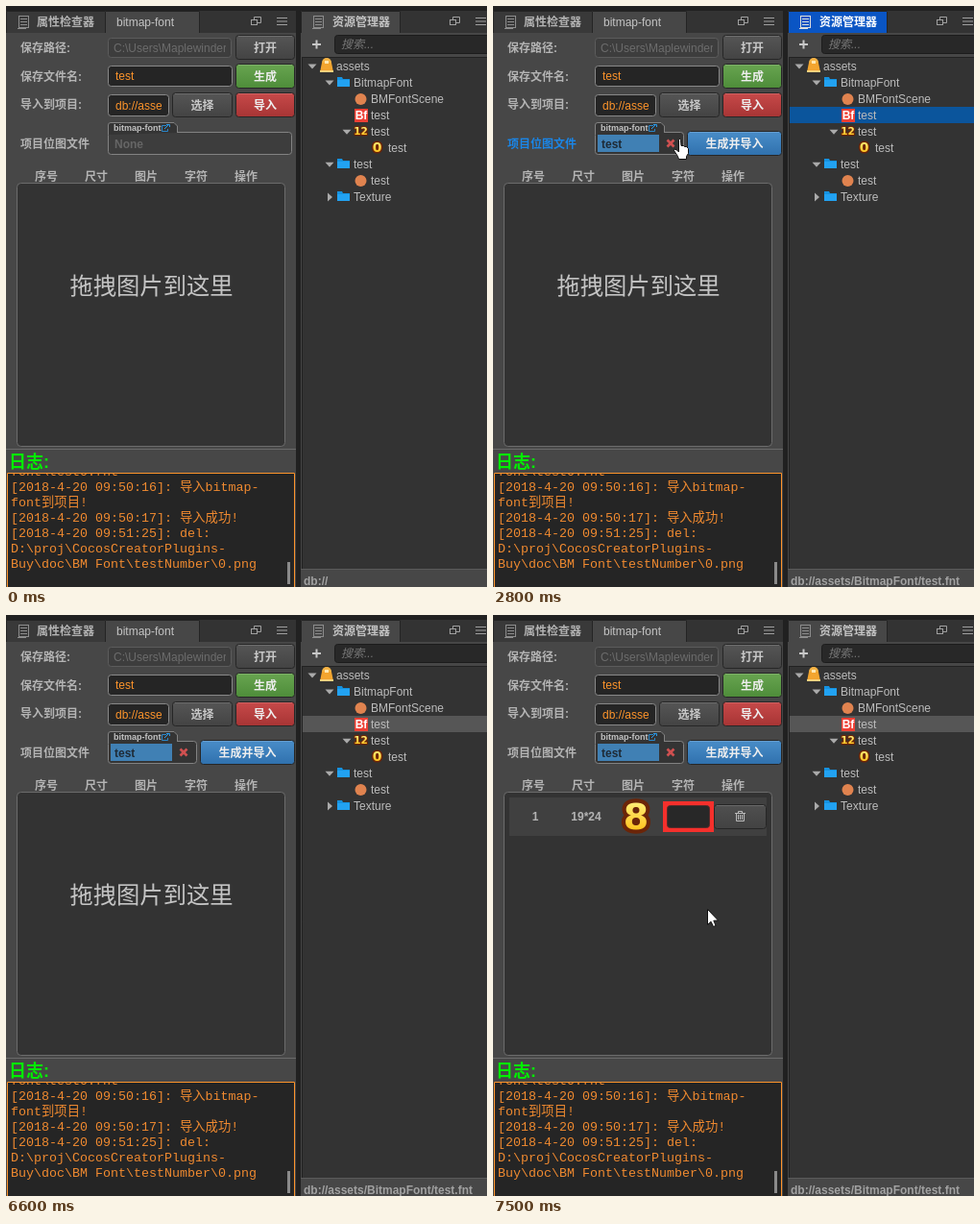
Animation, 501 px wide and 605 px high, one loop 8000 ms. Source, as an HTML page with a canvas:

```html
<!DOCTYPE html>
<html lang="zh-CN">
<head>
<meta charset="utf-8">
<style>
html, body { margin: 0; width: 100%; height: 100%; overflow: hidden; background: #222; }
canvas { display: block; }
</style>
</head>
<body>
<canvas id="stage" width="501" height="605"></canvas>
<script>
const ctx = document.getElementById('stage').getContext('2d');
const LOOP = 8000;
const SANS = '"Liberation Sans","Noto Sans CJK SC","Noto Sans CJK",sans-serif';
const MONO = '"Liberation Mono","Noto Sans CJK SC","Noto Sans CJK",monospace';
const GREY = '#b4b4b4', ORANGE = '#fd942b', BODY = '#474747', DARK = '#333', BLUE = '#0a55c4';

function rect(x, y, w, h, fill) {
  ctx.fillStyle = fill;
  ctx.fillRect(x, y, w, h);
}

function box(x, y, w, h, fill, border, r = 3) {
  ctx.beginPath();
  ctx.roundRect(x + .5, y + .5, w - 1, h - 1, r);
  ctx.fillStyle = fill;
  ctx.fill();
  ctx.strokeStyle = border;
  ctx.lineWidth = 1;
  ctx.stroke();
}

function shade(y, h, top, bottom) {
  const g = ctx.createLinearGradient(0, y, 0, y + h);
  g.addColorStop(0, top);
  g.addColorStop(1, bottom);
  return g;
}

// y is the vertical middle of the glyphs
function text(s, x, y, color = GREY, { size = 12, weight = 'normal', align = 'left', family = SANS } = {}) {
  ctx.font = `${weight} ${size}px ${family}`;
  ctx.textAlign = align;
  ctx.fillStyle = color;
  ctx.fillText(s, x, Math.round(y + size * .37));
}
const bold = (s, x, y, color, align) => text(s, x, y, color, { weight: 'bold', align });

function shape(points, fill) {
  ctx.beginPath();
  points.forEach(([x, y]) => ctx.lineTo(x, y));
  ctx.closePath();
  ctx.fillStyle = fill;
  ctx.fill();
}

function line(points, color, width = 1) {
  ctx.beginPath();
  points.forEach(([x, y]) => ctx.lineTo(x, y));
  ctx.strokeStyle = color;
  ctx.lineWidth = width;
  ctx.stroke();
}

function clipped(x, y, w, h, draw) {
  ctx.save();
  ctx.beginPath();
  ctx.rect(x, y, w, h);
  ctx.clip();
  draw();
  ctx.restore();
}

function button(label, x, y, w, h, top, bottom, color = '#eee') {
  box(x, y, w, h, shade(y, h, top, bottom), '#262626');
  line([[x + 3, y + 1.5], [x + w - 3, y + 1.5]], 'rgba(255,255,255,.14)');
  bold(label, x + w / 2, y + h / 2 + .5, color, 'center');
}

function input(x, y, w, h, value) {
  box(x, y, w, h, '#252525', '#888');
  clipped(x + 7, y, w - 15, h, () => text(value, x + 8, y + h / 2, ORANGE));
}

function docIcon(x, active) {
  const c = active ? '#ddd' : '#8c8c8c';
  ctx.strokeStyle = c;
  ctx.lineWidth = 1;
  ctx.strokeRect(x + 1.5, 10.5, 10, 12);
  for (const y of [13.5, 16.5, 19.5]) line([[x + 3, y], [x + 10, y]], c);
  line([[x, 23.5], [x + 9, 23.5]], c);
}

function windowIcons(x) {
  ctx.strokeStyle = '#a0a0a0';
  ctx.lineWidth = 1;
  ctx.strokeRect(x + .5, 14.5, 6, 5);
  line([[x + 3.5, 14], [x + 3.5, 11.5], [x + 10.5, 11.5], [x + 10.5, 17.5], [x + 7, 17.5]], '#a0a0a0');
  for (const y of [12.5, 16, 19.5]) line([[x + 27, y], [x + 38, y]], '#a0a0a0');
}

function tab(x, w, active, focused) {
  rect(x, 5, w, 23, focused ? BLUE : active ? BODY : '#393939');
  line([[x + .5, 28], [x + .5, 5.5], [x + w - .5, 5.5], [x + w - .5, 28]], '#242424');
}

function digits(s, x, y, size) {
  ctx.font = `bold ${size}px "DejaVu Sans",sans-serif`;
  ctx.textAlign = 'center';
  ctx.lineJoin = 'round';
  const base = y + size * .365;
  ctx.lineWidth = size * .22;
  ctx.strokeStyle = '#6b2508';
  ctx.strokeText(s, x, base);
  ctx.fillStyle = shade(y - size * .4, size * .8, '#fff07a', '#ffc21e');
  ctx.fillText(s, x, base);
  ctx.lineJoin = 'miter';
}

function arrowIcon(x, y, open) {
  shape(open ? [[x - 4.5, y - 2], [x + 4.5, y - 2], [x, y + 3]]
             : [[x - 2, y - 4.5], [x - 2, y + 4.5], [x + 3, y]], '#aaa');
}

function folder(x, y) {
  shape([[x, y - 5], [x + 5, y - 5], [x + 6, y - 3], [x + 13, y - 3], [x + 13, y + 5], [x, y + 5]], '#1592e0');
  rect(x, y - 2, 13, 7, '#22a2f2');
}

function dot(x, y) {
  ctx.beginPath();
  ctx.arc(x, y, 6, 0, 7);
  ctx.fillStyle = '#e0834f';
  ctx.fill();
}

function bag(x, y) {
  ctx.beginPath();
  ctx.arc(x, y - 3, 5, 0, 7);
  ctx.fillStyle = '#f6b445';
  ctx.fill();
  shape([[x - 5, y - 3], [x + 5, y - 3], [x + 7, y + 7], [x - 7, y + 7]], '#f3a52f');
  rect(x - 2, y - 5, 4, 3, '#ffe7b0');
  rect(x - 7, y + 5, 14, 2, '#ffd27c');
}

function leftPanel(s) {
  rect(0, 5, 302, 600, BODY);
  rect(0, 5, 302, 23, DARK);
  tab(0, 104, false, false);
  docIcon(12, false);
  bold('属性检查器', 32, 17, GREY);
  tab(103, 99, true, s.focus === 'left');
  text('bitmap-font', 115, 17, s.focus === 'left' ? '#fff' : '#c4c4c4');
  windowIcons(255);

  const labels = ['保存路径:', '保存文件名:', '导入到项目:'];
  labels.forEach((label, i) => bold(label, 15, 44 + 29.5 * i, GREY));
  bold('项目位图文件', 15, 143.5, s.labelHot ? '#1a86e8' : GREY);

  box(106, 33, 129, 21, '#3d3d3d', '#5c5c5c');
  clipped(110, 33, 119, 21, () => text('C:\\Users\\Maplewinders', 112, 44, '#6c6c6c'));
  button('打开', 239, 30, 62, 26, '#565656', '#434343', '#c8c8c8');
  input(106, 62, 130, 22, 'test');
  button('生成', 239, 60, 62, 26, '#69a551', '#4d8c39');
  input(106, 92, 64, 23, 'db://asse');
  button('选择', 173, 90, 63, 26, '#565656', '#434343', '#c8c8c8');
  button('导入', 239, 90, 62, 26, '#c84a4a', '#a63434');
  assetField(s);

  ['序号', '尺寸', '图片', '字符', '操作'].forEach((h, i) => bold(h, 30 + 52 * i, 178, GREY));
  box(11, 184, 280, 275, DARK, '#6c6c6c', 4);
  if (s.row) imageRow();
  else text('拖拽图片到这里', 151.5, 291, '#c4c4c4', { size: 24.3, align: 'center' });
  log();
}

function assetField({ filled, dropHot }) {
  const border = dropHot ? ORANGE : '#828282';
  box(106, 131, filled ? 93 : 192, 24, filled ? '#343434' : '#3d3d3d', border);
  ctx.beginPath();
  ctx.moveTo(106.5, 134);
  ctx.lineTo(106.5, 124);
  ctx.quadraticCurveTo(106.5, 121.5, 109, 121.5);
  ctx.lineTo(175, 121.5);
  ctx.lineTo(178.5, 125);
  ctx.lineTo(178.5, 132);
  ctx.fillStyle = '#343434';
  ctx.fill();
  ctx.strokeStyle = border;
  ctx.stroke();
  text('bitmap-font', 112, 127, '#c4c4c4', { size: 9, weight: 'bold' });
  line([[167, 124.5], [162.5, 124.5], [162.5, 130.5], [168.5, 130.5], [168.5, 128]], '#2a86c8');
  line([[165, 128], [170, 123]], '#2a9ae8');
  line([[167, 123.5], [170.5, 123.5], [170.5, 126]], '#2a9ae8');
  if (!filled) {
    bold('None', 113, 144, '#666');
    return;
  }
  rect(109, 134, 64, 18, '#4080b4');
  bold('test', 113, 143.5, '#1e2a36');
  line([[181.5, 139.5], [188.5, 146.5]], '#d05050', 2.6);
  line([[188.5, 139.5], [181.5, 146.5]], '#d05050', 2.6);
  button('生成并导入', 202, 130, 99, 26, '#4a8ec9', '#2f70ad');
}

function imageRow() {
  rect(17, 190, 268, 40, '#404040');
  bold('1', 44, 210, GREY, 'center');
  bold('19*24', 97, 210, GREY, 'center');
  digits('8', 149, 209, 38);
  rect(177, 194, 53, 32, '#f5302c');
  box(181, 198, 45, 24, '#282828', '#5a2a2a');
  button('', 230, 197, 55, 26, '#505050', '#424242');
  const c = '#bbb';
  line([[252, 206.5], [263, 206.5]], c);
  line([[255.5, 206], [255.5, 204.5], [259.5, 204.5], [259.5, 206]], c);
  line([[253.5, 207], [253.5, 214.5], [261.5, 214.5], [261.5, 207]], c);
  for (const x of [255.5, 257.5, 259.5]) line([[x, 208], [x, 213]], c);
}

function log() {
  line([[0, 461.5], [302, 461.5]], '#6a6a6a');
  text('日志:', 3, 474, '#00f000', { size: 18, weight: 'bold' });
  rect(1, 486, 300, 119, '#252525');
  clipped(2, 487, 290, 118, () => [
    'font\\test0.fnt',
    '[2018-4-20 09:50:16]: 导入bitmap-',
    'font到项目!',
    '[2018-4-20 09:50:17]: 导入成功!',
    '[2018-4-20 09:51:25]: del:',
    'D:\\proj\\CocosCreatorPlugins-',
    'Buy\\doc\\BM Font\\testNumber\\0.png'
  ].forEach((s, i) => text(s, 5, 484.5 + 16 * i, '#f08a30', { size: 13.333, family: MONO })));
  rect(293, 579, 3, 23, '#8a8a8a');
  line([[1.5, 605], [1.5, 486.5], [300.5, 486.5], [300.5, 605]], ORANGE);
}

function rightPanel(s) {
  const focused = s.focus === 'right';
  rect(307, 5, 194, 600, BODY);
  rect(307, 5, 194, 23, DARK);
  tab(307, 104, true, focused);
  docIcon(319, focused);
  bold('资源管理器', 340, 17, focused ? '#fff' : '#c4c4c4');
  windowIcons(462);

  rect(319, 39, 9, 2, '#c8c8c8');
  rect(322.5, 35.5, 2, 9, '#c8c8c8');
  box(342, 30, 170, 20, '#282828', s.searchHot ? '#999' : '#1c1c1c');
  text('搜索...', 349, 40, '#777', { weight: 'italic' });

  rect(308, 53, 193, 533, DARK);
  line([[308.5, 586], [308.5, 53.5], [501, 53.5]], '#222');
  line([[307, 586.5], [501, 586.5]], '#5a5a5a');
  if (s.selected) rect(309, 105, 192, 17, focused ? '#0b559c' : '#565656');
  tree();
  bold(s.selected ? 'db://assets/BitmapFont/test.fnt' : 'db://', 310, 599, '#a2a2a2');
}

function tree() {
  const names = ['assets', 'BitmapFont', 'BMFontScene', 'test', 'test', 'test', 'test', 'test', 'Texture'];
  const depths = [0, 1, 2, 2, 2, 3, 1, 2, 1];
  names.forEach((name, i) => {
    const x = 344 + 18 * depths[i], y = 62.5 + 17.05 * i;
    text(name, x, y, '#bcbcbc');
    if (depths[i] === 1) folder(x - 17, Math.floor(y));
    if ([0, 1, 4, 6, 8].includes(i)) arrowIcon(x - 25, y, i < 8);
  });
  bag(334, 62);
  dot(369.5, 97);
  dot(369.5, 182);
  rect(363, 107, 14, 14, '#ee4035');
  bold('Bf', 370, 114, '#fff', 'center');
  digits('12', 369.5, 130.5, 10.5);
  digits('0', 386.5, 146.5, 14);
}

function outlined(points, x, y) {
  ctx.save();
  ctx.translate(x + .5, y + .5);
  shape(points, '#fff');
  ctx.strokeStyle = '#111';
  ctx.lineWidth = 1;
  ctx.stroke();
  ctx.restore();
}

const ARROW = [[0, 0], [0, 16], [3.6, 12.8], [6, 18], [8.6, 17], [6.3, 11.8], [11, 11.5]];
const HAND = [[5, 1], [6, 0], [7, 1], [7.5, 7], [10, 7], [11, 8], [13, 8], [15, 10], [15, 15],
  [13, 18], [13, 21], [5, 21], [4, 18], [0, 12], [1, 10.5], [3, 11.5], [5, 13.5]];

function pointer([, x, y, kind]) {
  if (kind === 'ghost') ghost(x - 53, y - 93);
  outlined(kind === 'hand' ? HAND : ARROW, x, y);
  if (kind === 'drag') {
    ctx.setLineDash([2, 1]);
    ctx.strokeStyle = '#ddd';
    ctx.strokeRect(x + 1.5, y + 20.5, 13, 7);
    ctx.setLineDash([]);
  }
}

function ghost(x, y) {
  box(x, y, 104, 104, shade(y, 104, 'rgba(150,160,164,.62)', 'rgba(96,140,160,.62)'), 'rgba(130,160,175,.6)');
  ctx.globalAlpha = .8;
  digits('8', x + 48, y + 52, 25);
  ctx.globalAlpha = 1;
  box(x + 63, y + 106, 51, 20, '#fff', '#777', 0);
  const ay = y + 116.5;
  line([[x + 66, ay], [x + 77, ay]], '#1d4fc0');
  line([[x + 72.5, ay - 4.5], [x + 77, ay], [x + 72.5, ay + 4.5]], '#1d4fc0');
  text('移动', x + 83, y + 116, '#1d3fa8');
}

// [start ms, x, y, kind]; each entry holds until the next one
const POINTER = [
  [0], [600, 468, 32, 'arrow'], [700, 430, 58, 'arrow'], [800, 404, 90, 'arrow'], [900, 391, 109, 'arrow'],
  [1300, 391, 112, 'arrow'], [1400, 391, 114, 'arrow'],
  [2100, 393, 110, 'drag'], [2200, 350, 118, 'drag'], [2300, 285, 130, 'drag'], [2400, 220, 138, 'drag'], [2500, 188, 140, 'drag'],
  [2800, 188, 138, 'hand'], [3500, 193, 152, 'arrow'], [3600, 200, 182, 'arrow'], [3700, 209, 222, 'arrow'], [3800, 214, 246, 'arrow'],
  [4500, 210, 243, 'arrow'], [4800, 377, 233, 'arrow'], [4900],
  [6800, 470, 146, 'ghost'], [6900, 330, 232, 'ghost'], [7000, 223, 306, 'ghost'], [7400, 223, 306, 'arrow']
];

function draw(t) {
  const within = (a, b) => t >= a && t < b;
  const state = {
    focus: within(1500, 4000) ? 'right' : within(4000, 6600) ? 'left' : '',
    selected: t >= 1500,
    searchHot: within(600, 700),
    dropHot: within(2500, 2800),
    filled: t >= 2800,
    labelHot: within(2800, 3500),
    row: t >= 7500
  };
  rect(0, 0, 501, 605, '#212121');
  leftPanel(state);
  rightPanel(state);
  const p = POINTER.findLast(([start]) => start <= t);
  if (p.length > 1) pointer(p);
}

const begin = performance.now();
function tick() {
  draw((performance.now() - begin) % LOOP);
  requestAnimationFrame(tick);
}
tick();
</script>
</body>
</html>
```
